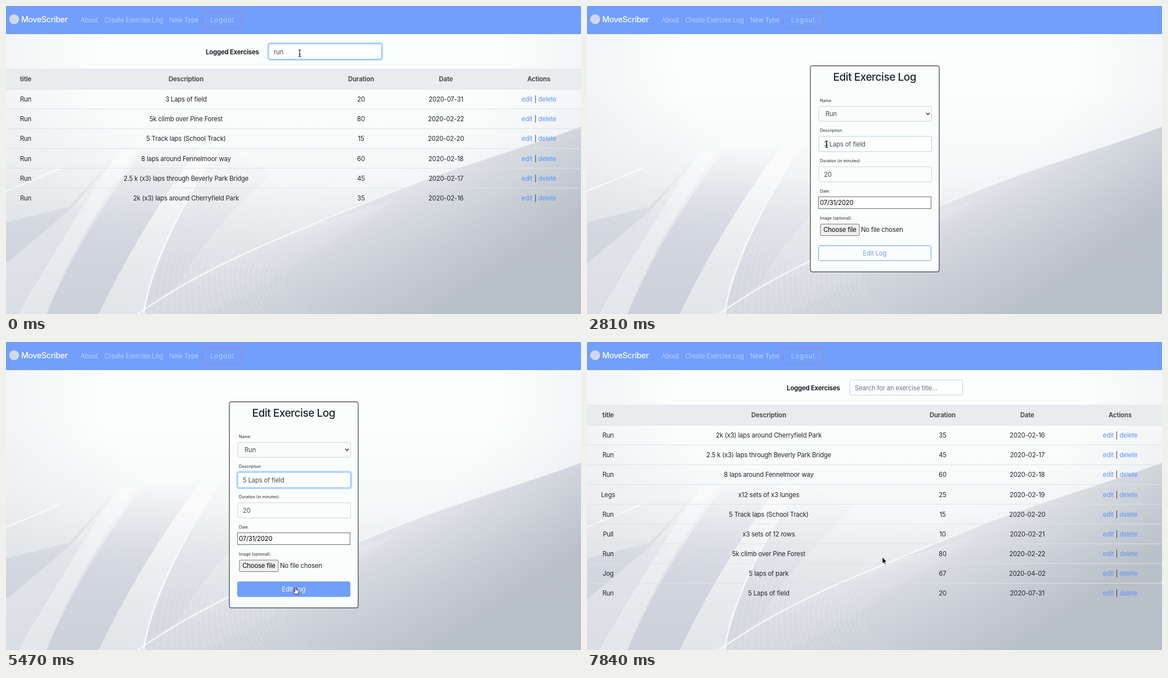
Write an HTML page that moves like this. It is 1022 by 548 pixels and loops after 7990 ms.

```html
<!DOCTYPE html>
<html lang="en">
<head>
<meta charset="utf-8">
<title>Exercise log</title>
<style>
  html, body { margin: 0; width: 100%; height: 100%; overflow: hidden; background: #fcfdfd; }
  svg { display: block; width: 100vw; height: 100vh; }
  text { font: 11.3px Inter, "Open Sans", sans-serif; letter-spacing: -.015em; fill: #212529; white-space: pre; }
  .mid { text-anchor: middle; }
  .bold { font-weight: 700; }
  .head { font-weight: 700; fill: #495057; }
  .nav { fill: #b8d0fe; }
  .brand { font-size: 14.2px; font-weight: 500; fill: #fff; letter-spacing: -.025em; }
  .wide { letter-spacing: 1px; }
  .link { fill: #5e94fb; }
  .label { font-size: 7.2px; letter-spacing: 0; }
  .field { fill: #495057; }
  .hint { fill: #6c757d; }
  .black { fill: #000; }
  .title { font-size: 19px; font-weight: 500; letter-spacing: -.025em; }
  .hello { font-size: 20.4px; letter-spacing: -.02em; }
  .mono { font: 21.5px "Liberation Mono", "DejaVu Sans Mono", monospace; letter-spacing: 0; }
</style>
</head>
<body>
<svg id="stage" viewBox="0 0 1022 548" preserveAspectRatio="none" xmlns="http://www.w3.org/2000/svg">
  <defs>
    <linearGradient id="sky" x2="0" y2="1">
      <stop offset=".2" stop-color="#fcfdfd"/>
      <stop offset=".5" stop-color="#f6f7f8"/>
      <stop offset=".75" stop-color="#e8eaed"/>
      <stop offset="1" stop-color="#dadee3"/>
    </linearGradient>
    <radialGradient id="edges" gradientUnits="userSpaceOnUse" cx="0" cy="0" r="1" gradientTransform="translate(520 90) scale(640 430)">
      <stop offset=".55" stop-color="#ccd2d9" stop-opacity="0"/>
      <stop offset="1" stop-color="#ccd2d9" stop-opacity=".34"/>
    </radialGradient>
    <linearGradient id="hill" gradientUnits="userSpaceOnUse" x1="560" y1="290" x2="760" y2="560">
      <stop offset="0" stop-color="#c4cad2" stop-opacity="0"/>
      <stop offset=".5" stop-color="#bfc6cf" stop-opacity=".5"/>
      <stop offset="1" stop-color="#b2bac3" stop-opacity=".85"/>
    </linearGradient>
    <linearGradient id="blade" gradientUnits="userSpaceOnUse" x1="0" y1="245" x2="0" y2="548">
      <stop offset="0" stop-color="#c8cdd8" stop-opacity="0"/>
      <stop offset=".5" stop-color="#c8cdd8" stop-opacity=".55"/>
      <stop offset="1" stop-color="#c5cbd5" stop-opacity=".6"/>
    </linearGradient>
    <linearGradient id="glow" gradientUnits="userSpaceOnUse" x1="0" y1="250" x2="0" y2="400">
      <stop offset="0" stop-color="#fff" stop-opacity="0"/>
      <stop offset="1" stop-color="#fff" stop-opacity=".75"/>
    </linearGradient>
  </defs>
  <g id="backdrop"></g>
  <g id="navbar"></g>
  <g id="filtered"></g>
  <g id="form"></g>
  <g id="welcome"></g>
  <g id="all"></g>
  <g id="cursor" stroke-linejoin="round">
    <path id="arrow" d="M0 0V11.2L2.6 8.8L4.3 12.7L6 12L4.3 8.2H7.8Z" fill="#000" stroke="#fff" stroke-width=".7"/>
    <path id="ibeam" d="M-2.5-6Q0-6 0-4.5Q0-6 2.5-6M0-4.5V4.5M-2.5 6Q0 6 0 4.5Q0 6 2.5 6M-1.4 1.6H1.4" fill="none" stroke="#111" stroke-width="1.1"/>
    <path id="hand" d="M-1.1 1Q0-.6 1.1 1V4.6L5 5.5Q6.3 6 6.3 7.4L5.4 10.8V12.5H-1.1L-4 8.6Q-4.7 7-3.3 6.8L-1.1 8.2Z" fill="#fff" stroke="#111"/>
  </g>
</svg>
<script>
const LOOP = 7990;
const BRAND = 'MoveScriber';
const $ = id => document.getElementById(id);

const text = (x, y, str, cls = '', extra = '') => `<text x="${x}" y="${y}" class="${cls}" ${extra}>${str}</text>`;
const box = (x, y, w, h, fill, stroke, extra = 'rx="2.5"') =>
  `<rect x="${x}" y="${y}" width="${w}" height="${h}" fill="${fill}" stroke="${stroke}" ${extra}/>`;
const path = (d, fill, extra = '') => `<path d="${d}" fill="${fill}" ${extra}/>`;
const halo = (id, x, y, w, h) =>
  box(x - 1.5, y - 1.5, w + 3, h + 3, 'none', '#007bff', `id="${id}" rx="4" stroke-width="2.3" stroke-opacity=".27"`);

function backdrop() {
  let lines = '';
  for (let i = 0; i < 26; i++) {
    const k = i / 25;
    lines += `M${225 + 130 * k} 548Q${330 + 130 * k} ${470 + 30 * k} ${560 + 130 * k} ${385 - 40 * k}`;
    lines += `M${245 + 12 * i} 548Q${262 + 8 * i} ${440 + 3 * i} ${285 + 9 * i} ${400 + 2 * i}`;
  }
  let hatch = '';
  for (let i = 0; i < 16; i++) hatch += `M0 ${240 + 6 * i}L${170 - 5 * i} ${150 + 9 * i}`;
  const full = fill => box(0, 50, 1022, 498, fill, 'none', '');
  return full('url(#sky)') + full('url(#edges)') +
    path('M235 548C350 465 480 415 640 350S900 260 1022 215V548Z', 'url(#hill)') +
    path('M0 385L112 357L215 245L112 365L0 458Z', 'url(#blade)') +
    path('M0 458L112 362L150 355L22 548H0Z', '#dfe2e8', 'opacity=".45"') +
    path('M72 548Q135 400 245 255L345 250Q240 390 165 548Z', 'url(#blade)') +
    path('M245 548Q260 430 385 245L470 300Q360 400 310 490Z', 'url(#blade)', 'opacity=".4"') +
    path('M22 548Q110 395 200 260L235 255Q130 400 72 548Z', '#fff', 'opacity=".32"') +
    path('M165 548Q240 390 345 250L385 245Q270 420 245 548Z', '#fff', 'opacity=".3"') +
    path(lines, 'none', 'stroke="#fff" stroke-width=".6" opacity=".38"') +
    path(hatch, 'none', 'stroke="#fff" stroke-width=".7" opacity=".4"') +
    path('M0 329Q50 310 100 287', 'none', 'stroke="#fff" stroke-width="2" opacity=".8"') +
    path('M245 548Q262 425 385 245', 'none', 'stroke="url(#glow)" stroke-width="2.5"') +
    path('M235 548C350 465 480 415 640 350S730 312 780 290', 'none', 'stroke="url(#glow)" stroke-width="2.5"');
}

function navbar() {
  return box(0, 0, 1022, 50, '#719ffb', 'none', '') +
    '<circle cx="14.5" cy="23.5" r="8.7" fill="#d3d9e4"/>' +
    text(27, 28.5, BRAND, 'brand') +
    text(132.5, 28.5, 'About', 'nav') + text(175, 28.5, 'Create Exercise Log', 'nav') + text(290, 28.5, 'New Type', 'nav') +
    box(348.5, 11.5, 71, 26.5, 'none', '#a683b8', 'rx="2"') + text(363, 28.5, 'Logout', 'nav wide');
}

function table(rows, columns, hover) {
  const line = y => path(`M0 ${y}H1022`, 'none', 'stroke="#dee2e6"');
  const cells = (values, y, cls) => values.map((v, i) => text(columns[i], y, v, 'mid ' + cls)).join('');
  let out = text(355, 85.5, 'Logged Exercises', 'bold') +
    box(0, 112, 1022, 36, '#e9ecef', 'none', '') + line(112.5) + line(148) +
    cells(['title', 'Description', 'Duration', 'Date', 'Actions'], 134, 'head');
  rows.forEach((row, i) => {
    const y = 170 + 35.17 * i, x = columns[4];
    if (i) out += line(148 + 35.17 * i);
    out += cells(row, y, '') +
      text(x - 21, y, 'edit', 'mid link', hover && !i ? 'id="edit"' : '') +
      text(x - 6, y, '|', 'mid') + text(x + 15, y, 'delete', 'mid link');
  });
  return out;
}

const runs = [
  ['Run', '2k (x3) laps around Cherryfield Park', 35, '2020-02-16'],
  ['Run', '2.5 k (x3) laps through Beverly Park Bridge', 45, '2020-02-17'],
  ['Run', '8 laps around Fennelmoor way', 60, '2020-02-18'],
  ['Run', '5 Track laps (School Track)', 15, '2020-02-20'],
  ['Run', '5k climb over Pine Forest', 80, '2020-02-22'],
];
const everything = [
  ...runs.slice(0, 3),
  ['Legs', 'x12 sets of x3 lunges', 25, '2020-02-19'],
  runs[3],
  ['Pull', 'x3 sets of 12 rows', 10, '2020-02-21'],
  runs[4],
  ['Jog', '5 laps of park', 67, '2020-04-02'],
  ['Run', '5 Laps of field', 20, '2020-07-31'],
];
const found = [['Run', '3 Laps of field', 20, '2020-07-31'], ...[...runs].reverse()];

function form() {
  const labels = ['Name:', 'Description:', 'Duration (in minutes):', 'Date:', 'Image (optional):'];
  const labelY = [170.5, 224.3, 278.1, 332, 380];
  return box(397, 106.5, 229, 366.5, '#fbfcfc', '#111', 'rx="3"') +
    text(511.3, 133, 'Edit Exercise Log', 'title mid') +
    labels.map((s, i) => text(414, labelY[i], s, 'label')).join('') +
    box(412, 178.5, 200.5, 26.5, '#f9fafa', '#ced4da') + text(424, 196, 'Run', 'field') +
    path('M603 190L606 193.2L609 190', 'none', 'stroke="#333" stroke-width="1.5"') +
    halo('descHalo', 412, 232, 200.5, 27) +
    box(412, 232, 200.5, 27, '#fdfefe', '#ced4da', 'id="descBox" rx="2.5"') + text(421, 249.5, '', 'field', 'id="desc"') +
    path('', 'none', 'id="caret" stroke="#222"') +
    box(412, 286, 200.5, 27, '#fbfcfc', '#ced4da') + text(421, 303.5, '20', 'field') +
    box(411.5, 339.5, 200, 21, '#fff', '#6d6d6d', '') + text(414, 354.3, '07/31/2020', 'black') +
    box(415, 388, 69, 20.5, '#efefef', '#767676', 'rx="1.5"') + text(449.5, 402.4, 'Choose file', 'mid black') +
    text(487, 402.4, 'No file chosen') +
    box(411.5, 426.5, 200, 26.5, 'none', '#719ffb', 'id="save" rx="2.5"') +
    text(511.3, 444, 'Edit Log', 'mid', 'id="saveText"');
}

function welcome() {
  return text(380, 189, '<tspan font-weight="700">Welcome</tspan><tspan font-weight="500"> to</tspan>', 'hello') +
    text(501, 189, BRAND, 'mono') + text(511.5, 213, 'Take note with ease.', 'mid') +
    box(460.5, 245.5, 102, 28.5, '#fafcfe', '#c6daf5', 'id="login"') +
    text(511.7, 264, 'Log In', 'mid wide') + text(511.7, 302.5, 'Register', 'mid wide');
}

$('backdrop').innerHTML = backdrop();
$('navbar').innerHTML = navbar();
$('filtered').innerHTML = halo('searchHalo', 467, 67.5, 200.5, 27) + box(467, 67.5, 200.5, 27, '#fff', '#86bafa') +
  text(476, 85.5, 'run', 'field') + table(found, [35, 320, 631, 782, 947], true);
$('form').innerHTML = form();
$('welcome').innerHTML = welcome();
$('all').innerHTML = box(467, 67.5, 200.5, 27, '#fdfefe', '#ced4da') +
  text(476, 85.5, 'Search for an exercise title...', 'hint') + table(everything, [37.5, 323, 632, 782.5, 947.5]);

// Each move: first step, last step, number of steps, x, y.
const moves = [
  [150, 300, 2, 657, 146], [600, 1330, 6, 919.5, 167.5], [1770, 2810, 8, 426, 246],
  [2950, 2950, 1, 445, 312], [4290, 4590, 3, 516.5, 426], [4740, 5030, 3, 514.5, 436],
  [6220, 6660, 4, 496, 265], [7690, 7840, 2, 525, 383],
];
// Each entry: the time until which the value holds.
const scenes = [[1480, 'filtered'], [5770, 'form'], [7100, 'welcome'], [LOOP, 'all']];
const pointers = [[150, 'ibeam'], [2810, 'arrow'], [4290, 'ibeam'], [4590, 'arrow'],
  [6220, 'hand'], [6660, 'arrow'], [7100, 'hand'], [LOOP, 'arrow']];

const pick = (list, t) => list.find(([end]) => t < end)[1];
const within = (t, a, b) => t >= a && t < b;
const show = (id, on) => $(id).setAttribute('display', on ? 'inline' : 'none');
const showOnly = (list, name) => new Set(list.map(e => e[1])).forEach(id => show(id, id === name));

function pointerAt(t) {
  let x = 522, y = 84;
  for (const [start, end, steps, toX, toY] of moves) {
    if (t < start) break;
    const done = t >= end ? 1 : (Math.floor((t - start) / (end - start) * (steps - 1) + .04) + 1) / steps;
    const eased = done * done * (3 - 2 * done);
    x += (toX - x) * eased;
    y += (toY - y) * eased;
  }
  return [x, y];
}

function draw(t) {
  showOnly(scenes, pick(scenes, t));
  showOnly(pointers, pick(pointers, t));
  $('cursor').setAttribute('transform', `translate(${pointerAt(t)})`);

  show('searchHalo', t < 1330);
  $('edit').style.cssText = t >= 1330 ? 'fill:#5a6068;text-decoration:underline' : '';

  const erased = within(t, 3700, 3850);
  $('desc').textContent = (t < 3700 ? '3' : erased ? '' : '5') + ' Laps of field';
  $('desc').setAttribute('x', 421);
  $('caret').setAttribute('d', `M${erased ? 421.5 : 428.5} 239V252`);
  show('caret', within(t, 2950, 3400) || within(t, 3700, 4440) || within(t, 4880, 5470));
  show('descHalo', t >= 2950);
  $('descBox').setAttribute('stroke', t < 2810 ? '#ced4da' : t < 2950 ? '#b9cee9' : '#80bdff');

  const hovered = t >= 4740;
  $('save').setAttribute('fill', hovered ? '#719ffb' : 'none');
  $('saveText').style.fill = hovered ? '#fff' : '#719ffb';
  show('login', t >= 6950);
}

const began = performance.now();
function tick() {
  draw((performance.now() - began + 1) % LOOP);
  requestAnimationFrame(tick);
}
draw(0);
requestAnimationFrame(tick);
</script>
</body>
</html>
```
